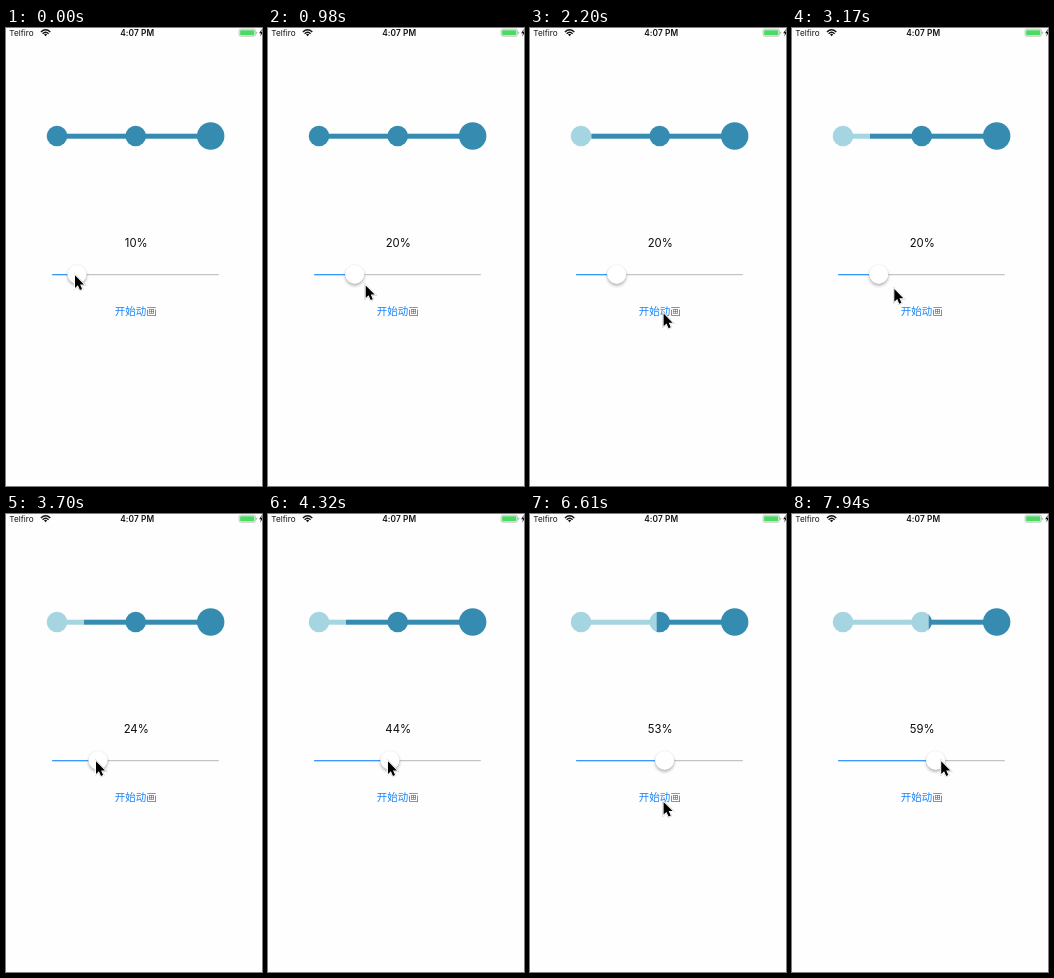
Animation of 256 by 458 pixels, one loop 8000 ms. Source, as an HTML page:

```html
<!DOCTYPE html>
<html lang="zh">
<head>
<meta charset="utf-8">
<title>Progress slider</title>
<style>
  html, body { margin: 0; width: 100%; height: 100%; overflow: hidden; background: #fefefe; }
  svg { display: block; width: 100%; height: 100%; font-family: Inter, "Noto Sans CJK SC", "Noto Sans CJK", sans-serif; }
  .knob { filter: drop-shadow(0 2px 1.5px rgba(0, 0, 0, .28)); }
  .pointer { filter: drop-shadow(0 .7px .7px rgba(0, 0, 0, .5)); }
</style>
</head>
<body>
<svg viewBox="0 0 256 458">
  <defs>
    <g id="steps">
      <rect x="51" y="105.7" width="154" height="5"/>
      <circle cx="51" cy="108" r="10.3"/>
      <circle cx="129.7" cy="108" r="10.3"/>
      <circle cx="204.7" cy="108" r="13.7"/>
    </g>
    <clipPath id="done"><rect id="doneBox" x="40" y="90" width="0" height="36"/></clipPath>
    <clipPath id="todo"><rect id="todoBox" x="40" y="90" width="180" height="36"/></clipPath>
  </defs>

  <!-- status bar -->
  <text x="3.3" y="7.5" font-size="8.2" fill="#111">Telfiro</text>
  <g fill="none" stroke="#111" stroke-width="1.4">
    <path d="M34.9 3.9Q39.6 -.5 44.3 3.9"/>
    <path d="M36.6 5.7Q39.6 2.9 42.6 5.7"/>
    <path d="M38 6.6Q39.6 5.1 41.2 6.6L39.6 8.2Z" fill="#111" stroke="none"/>
  </g>
  <text x="131.2" y="7.5" font-size="8.3" font-weight="600" letter-spacing=".1" fill="#111" text-anchor="middle">4:07 PM</text>
  <rect x="233.1" y="1.2" width="16.3" height="7" rx="1.6" fill="none" stroke="#aaa" stroke-width=".7"/>
  <rect x="234.1" y="2.2" width="14.3" height="5" rx=".8" fill="#4cd964"/>
  <path d="M250.2 3.5q1.1 .3 1.1 1.2t-1.1 1.2z" fill="#aaa"/>
  <path d="M255.8 1L253.2 5.2H255L254.2 8.4L257.2 4.1H255.3Z" fill="#111"/>

  <!-- step bar -->
  <use href="#steps" fill="#358bb0" clip-path="url(#todo)"/>
  <use href="#steps" fill="#a5d5e1" clip-path="url(#done)"/>

  <!-- slider -->
  <text id="label" x="130.2" y="219" font-size="11.3" fill="#0a0a0a" text-anchor="middle"></text>
  <rect x="46" y="246" width="167" height="1.2" rx=".6" fill="#c4c4c4"/>
  <rect id="fill" x="46" y="246" height="1.2" rx=".6" fill="#3c98fb"/>
  <circle id="knob" class="knob" cy="246.3" r="9.6" fill="#fff" stroke="#000" stroke-opacity=".07" stroke-width=".5"/>
  <text id="button" x="129.8" y="287.2" font-size="10.5" fill="#1583fb" text-anchor="middle">开始动画</text>

  <path id="pointer" class="pointer" d="M0 0V12.6L2.9 9.9L5 14.6L7.1 13.7L5.1 9.1H9Z"
    fill="#000" stroke="#fff" stroke-width="2" paint-order="stroke"/>
</svg>
<script>
const LOOP = 8000, TICK = 88.2;
const el = id => document.getElementById(id);

// Drags and visits are in ticks, tap times in ms.
const drags = [
  { from: 0, to: 6, by: 10.7 },
  { from: 41, to: 42, by: 3.6 },
  { from: 44, to: 55, by: 29 },
  { from: 88, to: 90, by: 6.1 }
];
const visits = [
  { from: 10, to: 17, back: 34, home: 39, y: 285.6, tap: 1655, goal: 20.9 },
  { from: 59, to: 62, back: 79, home: 85, y: 288, tap: 5720, goal: 53.7 }
];

const clamp = v => Math.min(1, Math.max(0, v));
const mix = (a, b, k) => a + (b - a) * k;
const ease = (n, from, to) => 1 - (1 - clamp((n - from) / (to - from))) ** 2;

// The pointer rides on the knob, and leaves it to tap the button.
function pointerAt(n, knobX) {
  let x = knobX - 2 + 7.6 * ease(n, 88, 90), y = 247.3;
  for (const v of visits) {
    const k = ease(n, v.from, v.to) - ease(n, v.back, v.home);
    x = mix(x, 133.6, k);
    y = mix(y, v.y, k);
  }
  return [x, y];
}

// Each tap clears the bar and fills it again in one second.
function edgeAt(t) {
  const v = visits.filter(v => t > v.tap).pop();
  return v ? 40.8 + 1.78 * v.goal * clamp((t - v.tap) / 1000) : 40;
}

// The button dims while pressed, then fades back.
function dimAt(t) {
  const v = visits.find(v => t > v.tap - 70 && t < v.tap + 300);
  return v ? 1 - clamp((t - v.tap - 90) / 210) : 0;
}

function draw(time) {
  const n = Math.floor((time + 8) / TICK), t = n * TICK;
  const percent = drags.reduce((p, d) => p + d.by * ease(n, d.from, d.to), 10.2);
  const knobX = 56 + 1.47 * percent;
  const [x, y] = pointerAt(n, knobX);
  const edge = edgeAt(t);

  el("label").textContent = Math.floor(percent) + "%";
  el("knob").setAttribute("cx", knobX);
  el("fill").setAttribute("width", knobX - 46);
  el("button").setAttribute("opacity", 1 - .7 * dimAt(t));
  el("doneBox").setAttribute("width", edge - 40);
  el("todoBox").setAttribute("x", edge);
  el("pointer").setAttribute("transform", `translate(${x} ${y})`);
}

const begin = performance.now();
function frame() {
  draw((performance.now() - begin) % LOOP);
  requestAnimationFrame(frame);
}
frame();
</script>
</body>
</html>
```
